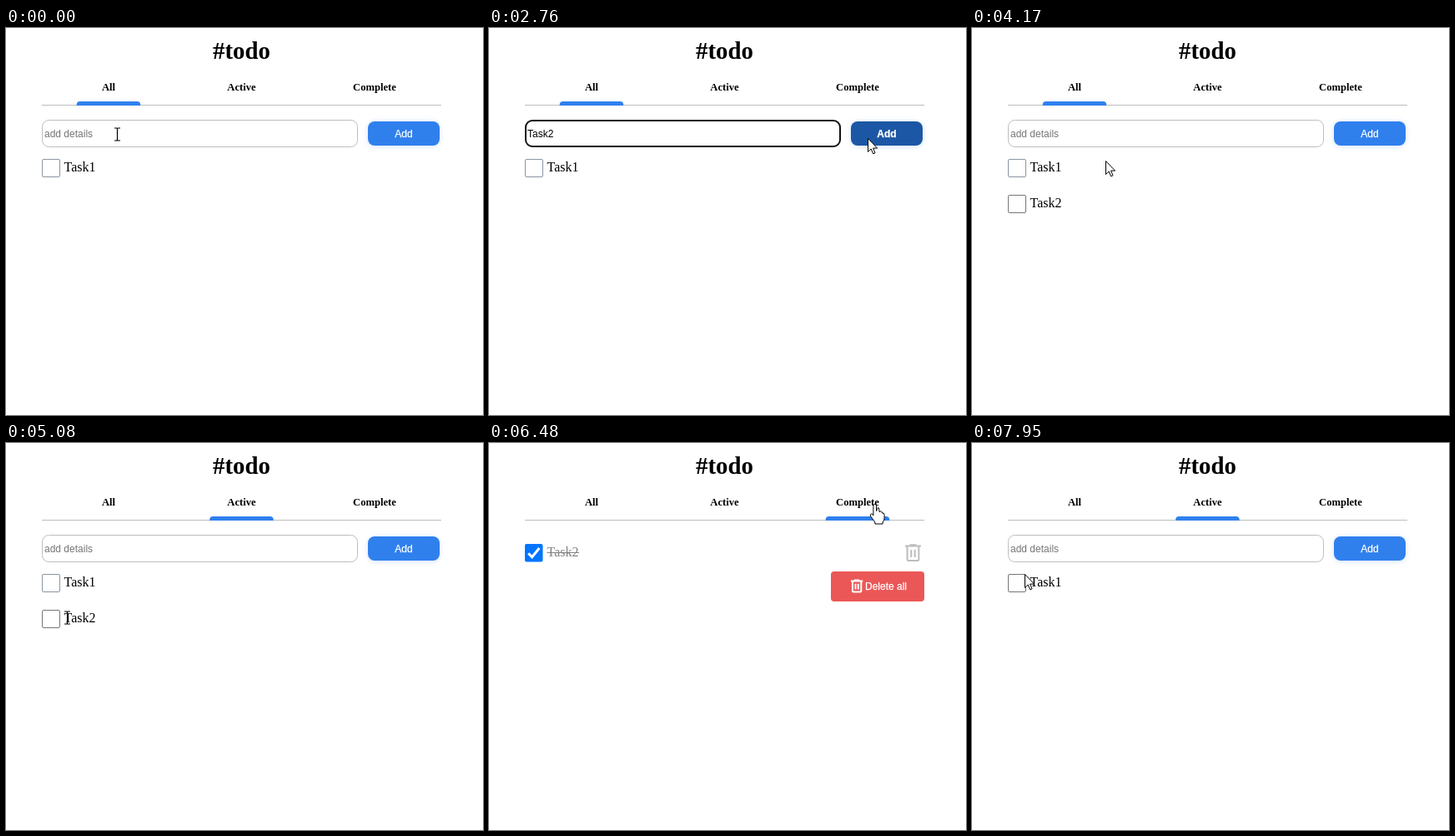
Animation of 572 by 464 pixels, one loop 8000 ms. Source, as an HTML page:

```html
<!DOCTYPE html>
<html lang="en">
<head>
<meta charset="utf-8">
<title>#todo</title>
<style>
  html, body { margin: 0; width: 100%; height: 100%; overflow: hidden; background: #fff; }
  svg { display: block; width: 572px; height: 464px; }
  text { white-space: pre; }
  .serif { font-family: "Liberation Serif", "Times New Roman", serif; }
  .sans { font-family: "Liberation Sans", Arial, sans-serif; font-size: 12px; }
  .title { font-size: 28.8px; font-weight: bold; text-anchor: middle; }
  .tab { font-size: 12.6px; font-weight: bold; text-anchor: middle; }
  .task { font-size: 16px; }
  .label { fill: #fff; stroke: #fff; stroke-width: .25; }
  .box { fill: #fff; stroke: #767676; }
  .shade { filter: drop-shadow(0 1px 3px rgba(47, 128, 237, .22)); }
  .line { fill: none; stroke-width: 2; vector-effect: non-scaling-stroke; }
</style>
</head>
<body>
<svg viewBox="0 0 572 464">
  <defs>
    <path id="bin" class="line" d="M0 2.5H19M5.5 1.2H13.5M2.6 2.5V18.5Q2.6 20 4.1 20H14.9Q16.4 20 16.4 18.5V2.5M7.3 7V16M11.7 7V16"/>
  </defs>
  <text class="serif title" x="282.5" y="37">#todo</text>
  <text class="serif tab" x="123" y="75">All</text>
  <text class="serif tab" x="282.5" y="75">Active</text>
  <text class="serif tab" x="442" y="75">Complete</text>
  <path d="M43 92.5H522" stroke="#bdbdbd"/>
  <path id="mark" d="M0 93V92Q0 88 4 88H72.5Q76.5 88 76.5 92V93Z" fill="#2f80ed"/>

  <g id="form">
    <rect id="field" fill="#fff"/>
    <text id="entry" class="sans" x="46" y="131"></text>
    <rect id="caret" y="120" width="1" height="14"/>
    <rect id="add" class="shade" x="434" y="112" width="86" height="29" rx="8"/>
    <text id="addText" class="sans label" x="477" y="131" text-anchor="middle">Add</text>
  </g>
  <g id="task1">
    <rect id="box1" class="box" x="43.5" y="157.5" width="21" height="21" rx="1.5"/>
    <text class="serif task" x="69.6" y="172">Task1</text>
  </g>
  <g id="task2">
    <rect class="box" x="43.5" y="200.5" width="21" height="21" rx="1.5"/>
    <text class="serif task" x="69.6" y="215">Task2</text>
  </g>
  <g id="done">
    <rect x="43" y="121" width="21.5" height="21.5" rx="2" fill="#0075ff"/>
    <path d="M47.2 132.2L51.6 136.8L60.4 126" fill="none" stroke="#fff" stroke-width="3"/>
    <text class="serif task" x="69.6" y="136" fill="#828282">Task2</text>
    <path d="M69.5 131.5H108" stroke="#828282"/>
    <use href="#bin" x="499" y="121" stroke="#bdbdbd"/>
    <rect x="410" y="154" width="112" height="36" rx="4" fill="#eb5757"/>
    <use href="#bin" transform="translate(434 163.5) scale(.75)" stroke="#fff"/>
    <text class="sans label" x="451" y="176">Delete all</text>
  </g>

  <g id="cursor">
    <path id="arrow" d="M.5 .5V16.5L4.2 13L6.7 18.8L9 17.8L6.6 12.1H11.6Z" fill="#fff" stroke="#000"/>
    <path id="beam" d="M-3.5-7.5H-1Q0-7.5 0-6.5Q0-7.5 1-7.5H3.5M0-6.5V6.5M-3.5 7.5H-1Q0 7.5 0 6.5Q0 7.5 1 7.5H3.5" fill="none" stroke="#000" stroke-width="1.2"/>
    <path id="hand" transform="translate(-.8 -.5)" d="M-1.8 2.2A1.8 1.8 0 0 1 1.8 2.2V8.5Q5-0.2 5.4 9.6Q8.4 7.4 8.6 11Q11.4 10.2 11.4 13.2V17Q11.4 19.8 9.4 22V24H.2V22L-5.2 14.8Q-6 12.2-4.2 11.8Q-2.8 11.8-1.8 13.8Z" fill="#fff" stroke="#000" stroke-linejoin="round"/>
  </g>
</svg>
<script>
const LOOP = 8000, STEP = 64;
const FOCUS = 130, ADDED = 3140, CHECKED = 5200;
const ALL = 0, ACTIVE = 1, COMPLETE = 2;
const keyTimes = [830, 950, 1260, 1320, 2060];

// Pointer moves: start, end, destination, vertical bow of the path
const moves = [
  [70, 200, 130, 126, 0],
  [2550, 2760, 454, 132, -46],
  [2880, 3330, 439, 153, 0],
  [3400, 3850, 73, 196, 32],
  [3990, 4480, 282, 66, 18],
  [4540, 4750, 206, 150, 0],
  [4820, 5140, 62, 212, 8],
  [5400, 6160, 462, 72, 20],
  [6230, 6480, 463, 73, 0],
  [7050, 7230, 248, 68, 0],
  [7370, 7950, 63, 157, 0]
];

const $ = id => document.getElementById(id);
const show = (id, on) => $(id).setAttribute('display', on ? 'inline' : 'none');
const set = (id, attrs) => {
  for (const k in attrs) $(id).setAttribute(k, attrs[k]);
};
const ease = s => s * s * (3 - 2 * s);
const within = (p, x, y, w, h) => p.x >= x && p.x <= x + w && p.y >= y && p.y <= y + h;
const markX = tab => 84.7 + 159.5 * tab;
const viewAt = t => t < 4480 ? ALL : t < 6090 || t >= 7370 ? ACTIVE : COMPLETE;

function pointer(t) {
  let x = 133, y = 127;
  for (const [t0, t1, toX, toY, bow] of moves) {
    if (t < t0) break;
    const n = Math.round((t1 - t0) / STEP) + 1;
    const step = Math.floor((t - t0) / (t1 - t0) * (n - 1) + .2) + 1;
    const e = ease(Math.min(1, step / n));
    x += (toX - x) * e;
    y += (toY - y) * e + bow * Math.sin(Math.PI * e);
  }
  return { x: Math.round(x), y: Math.round(y) };
}

function cursorKind(p, view, two) {
  if ([ALL, ACTIVE, COMPLETE].some(tab => within(p, markX(tab), 57, 77, 35))) return 'hand';
  if (view === COMPLETE) return 'arrow';
  const overText = within(p, 43, 110, 379, 33) || within(p, 69, 160, 39, 17) ||
    two && within(p, 69, 203, 39, 17);
  return overText ? 'beam' : 'arrow';
}

function drawForm(t, p) {
  const focus = t >= FOCUS && t < ADDED;
  const keys = focus ? keyTimes.filter(k => k <= t) : [];
  const typing = keys.length > 0;
  const inset = focus ? 1 : .5;
  set('field', {
    x: 43 + inset, y: 110 + inset, width: 379 - 2 * inset, height: 33 - 2 * inset, rx: 8,
    stroke: focus ? '#101010' : '#bdbdbd', 'stroke-width': 2 * inset
  });
  $('entry').textContent = typing ? 'Task2'.slice(0, keys.length) : 'add details';
  set('entry', { fill: typing ? '#000' : '#757575' });
  const idle = t - (typing ? keys[keys.length - 1] : FOCUS);
  show('caret', focus && idle % 1000 < 500);
  set('caret', { x: typing ? Math.floor(46 + $('entry').getComputedTextLength()) : 46 });
  set('add', { fill: within(p, 434, 112, 86, 29) ? '#1c57a5' : '#2f80ed' });
  set('addText', { 'font-weight': focus ? 700 : 400 });
}

function draw(t) {
  const view = viewAt(t);
  const two = t >= ADDED && t < CHECKED;
  const p = pointer(t);
  set('mark', { transform: `translate(${markX(view)} 0)` });
  show('form', view !== COMPLETE);
  show('task1', view !== COMPLETE);
  show('task2', two);
  show('done', view === COMPLETE);
  $('box1').style.stroke = t < CHECKED ? '#8b95a1' : '#767676';
  drawForm(t, p);

  const kind = cursorKind(p, view, two);
  for (const id of ['arrow', 'beam', 'hand']) show(id, id === kind);
  const half = kind === 'arrow' ? 0 : .5;
  set('cursor', { transform: `translate(${p.x + half} ${p.y + half})` });
}

const start = performance.now();
function tick() {
  draw((performance.now() - start) % LOOP);
  requestAnimationFrame(tick);
}
draw(0);
requestAnimationFrame(tick);
</script>
</body>
</html>
```
